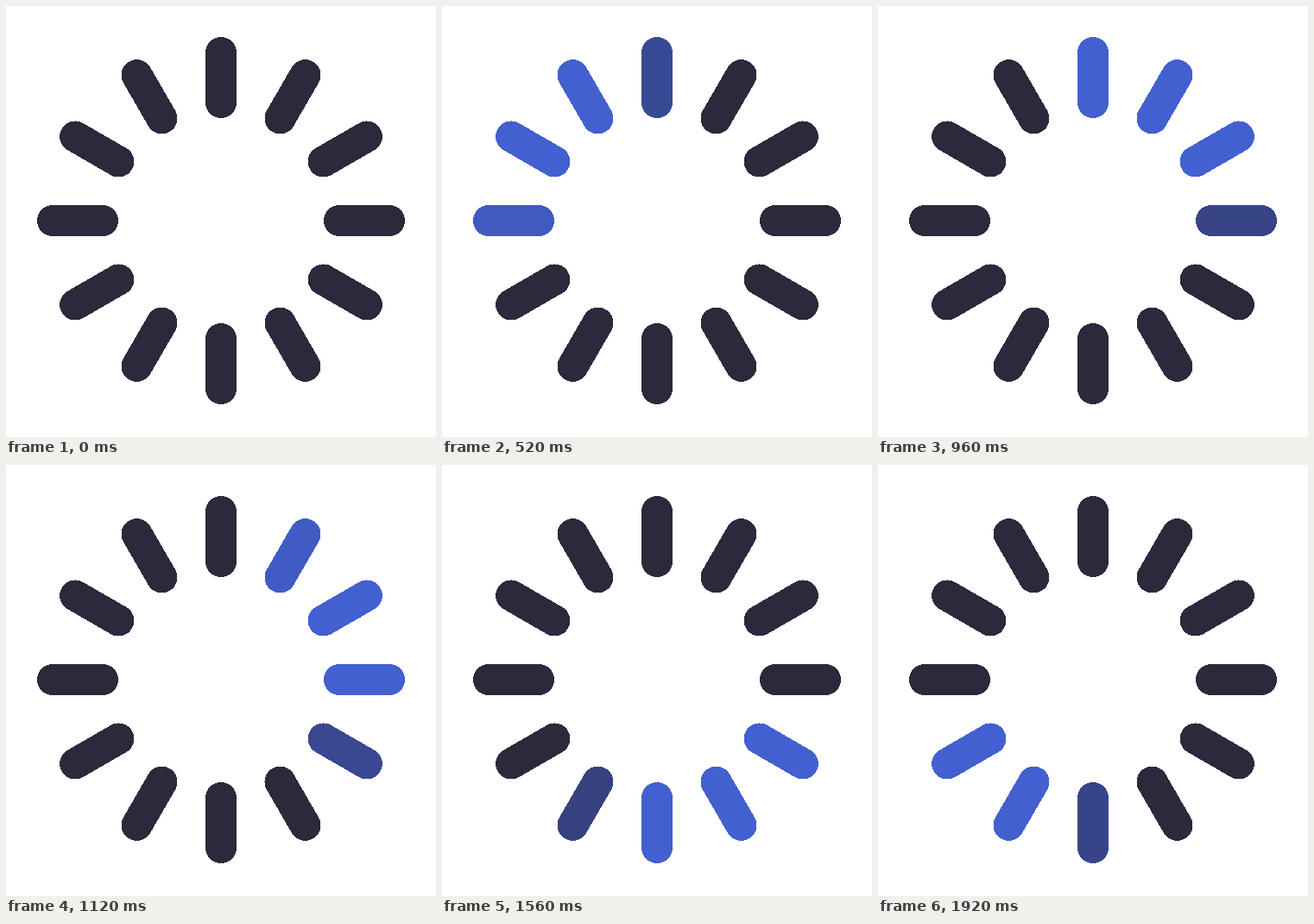
Recreate the animation shown at these times as an HTML page. Size 498 px wide and 500 px high, loop 1.96 s.

```html
<!DOCTYPE html>
<html lang="en">
<head>
<meta charset="utf-8">
<title>Loading spinner</title>
<style>
  /* Elapsed loop time in ms, advanced at 25 frames per second */
  @property --t {
    syntax: "<number>";
    inherits: true;
    initial-value: 0;
  }

  html, body {
    margin: 0;
    width: 100%;
    height: 100%;
    overflow: hidden;
    background: #fff;
  }

  svg {
    display: block;
    width: 498px;
    height: 500px;
    animation: clock 1960ms steps(49) infinite;
  }

  @keyframes clock {
    from { --t: 0; }
    to { --t: 1960; }
  }

  /* Bars light up clockwise from the left; each fades in, holds, fades out */
  rect {
    --age: calc(var(--t) - var(--k) * 150.77);
    --rise: clamp(0, var(--age) / 113, 1);
    --fall: clamp(0, (var(--age) - 508) / 113, 1);
    --lit: calc(var(--rise) - var(--fall));
    fill: rgb(
      calc(44 + 22 * var(--lit)),
      calc(41 + 55 * var(--lit)),
      calc(60 + 148 * var(--lit))
    );
    transform-origin: 249px 249px;
    transform: rotate(calc(var(--k) * 30deg));
    shape-rendering: crispEdges;
  }
</style>
</head>
<body>
<svg viewBox="0 0 498 500">
  <rect x="36" y="231" width="94" height="36" rx="18" style="--k: 0"/>
  <rect x="36" y="231" width="94" height="36" rx="18" style="--k: 1"/>
  <rect x="36" y="231" width="94" height="36" rx="18" style="--k: 2"/>
  <rect x="36" y="231" width="94" height="36" rx="18" style="--k: 3"/>
  <rect x="36" y="231" width="94" height="36" rx="18" style="--k: 4"/>
  <rect x="36" y="231" width="94" height="36" rx="18" style="--k: 5"/>
  <rect x="36" y="231" width="94" height="36" rx="18" style="--k: 6"/>
  <rect x="36" y="231" width="94" height="36" rx="18" style="--k: 7"/>
  <rect x="36" y="231" width="94" height="36" rx="18" style="--k: 8"/>
  <rect x="36" y="231" width="94" height="36" rx="18" style="--k: 9"/>
  <rect x="36" y="231" width="94" height="36" rx="18" style="--k: 10"/>
  <rect x="36" y="231" width="94" height="36" rx="18" style="--k: 11"/>
</svg>
</body>
</html>
```
